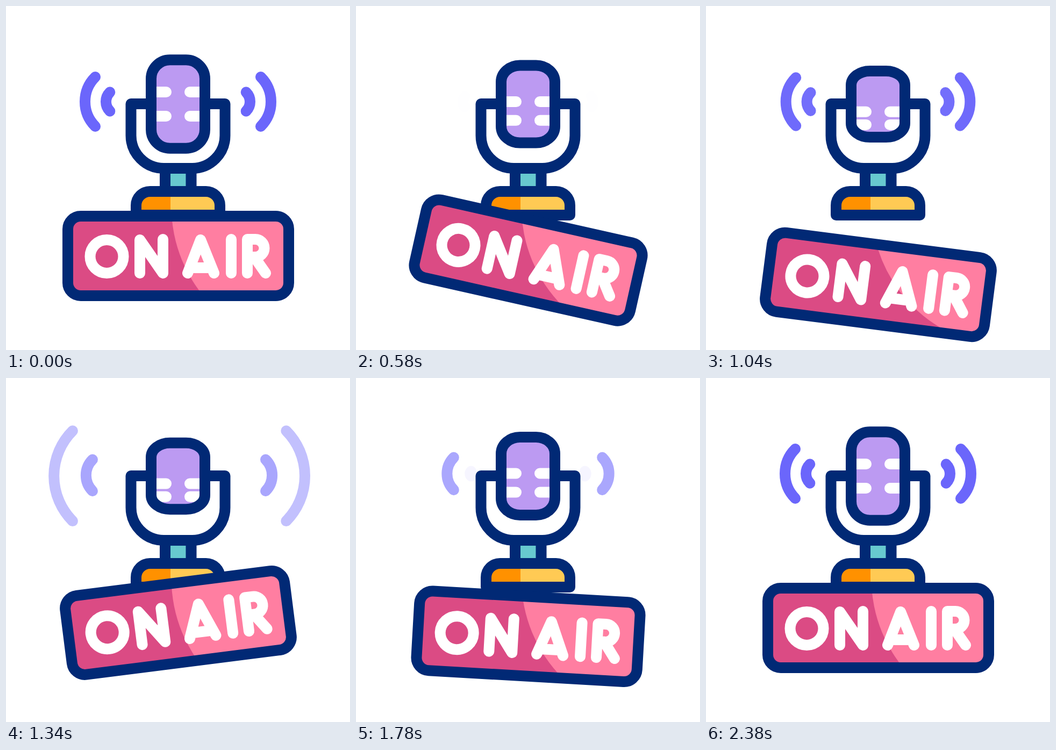
An HTML page for the animation above (2.4 s loop, 640x640 px).

```html
<!DOCTYPE html>
<html lang="en">
<head>
<meta charset="utf-8">
<title>On air</title>
<style>
  html, body { margin: 0; width: 100%; height: 100%; overflow: hidden; background: #fff; }
  svg { display: block; width: 100%; height: 100%; }
  .line { fill: none; stroke: #012975; stroke-width: 20; stroke-linejoin: round; }
  .white { fill: none; stroke: #fff; stroke-width: 20; stroke-linecap: round; stroke-linejoin: round; }
  #waves path { fill: none; stroke: #6b66fb; stroke-width: 20; stroke-linecap: round; }
</style>
</head>
<body>
<svg viewBox="0 0 640 640">
  <defs>
    <clipPath id="panel"><rect id="panelShape" x="115" y="391" width="411" height="148" rx="24"/></clipPath>
  </defs>
  <g id="waves"></g>

  <path class="line" d="M270 182H232.500V241A61 61 0 0 0 293.500 302H346.500A61 61 0 0 0 407.500 241V182H370"/>
  <path fill="#67c9cf" d="M300 312h40v30h-40z"/>
  <path class="line" d="M296 304V345M344.500 304V345"/>
  <path fill="#ff9100" d="M242 389V371a26 26 0 0 1 26-26h38v44z"/>
  <path fill="#ffca54" d="M306 345h66a26 26 0 0 1 26 26v18h-92z"/>
  <path class="line" d="M242 389V371a26 26 0 0 1 26-26H372a26 26 0 0 1 26 26v18z"/>

  <rect class="head" fill="#bc9af2" x="270" width="100" rx="35"/>
  <path id="bars" class="white"/>
  <rect class="head line" x="270" width="100" rx="35"/>

  <g class="sign">
    <rect fill="#db4b84" x="115" y="391" width="411" height="148" rx="24"/>
  </g>
  <circle clip-path="url(#panel)" fill="#ff7ea1" cx="570" cy="373" r="262.300"/>
  <g class="sign">
    <rect class="line" x="115" y="391" width="411" height="148" rx="24"/>
    <g class="white" role="img" aria-label="ON AIR">
      <circle cx="187.500" cy="466" r="31"/>
      <path d="M249 497V435L292 497V434"/>
      <path d="M338 497L362 435L387 497M347 487H378"/>
      <path d="M419 434V497"/>
      <path d="M449 497V434H464a16.500 16.500 0 0 1 0 33H449M462 467L483 497"/>
    </g>
  </g>
</svg>
<script>
const LOOP = 2400;
const $ = id => document.getElementById(id);
const all = selector => [...document.querySelectorAll(selector)];
const clamp = x => Math.min(1, Math.max(0, x));
const mix = (a, b, u) => a + (b - a) * u;
const smooth = x => { x = clamp(x); return x * x * (3 - 2 * x); };
const cubic = x => { x = clamp(x); return x < .5 ? 4 * x ** 3 : 1 - 4 * (1 - x) ** 3; };

// Eased interpolation through [time, value] pairs
function keys(t, list) {
  for (let i = 1; i < list.length; i++) {
    const [t0, a] = list[i - 1], [t1, b] = list[i];
    if (t < t1) return mix(a, b, smooth((t - t0) / (t1 - t0)));
  }
  return list[list.length - 1][1];
}

const TILT = [[0, 0], [785, 15.2], [820, 15.2], [1377, -7.5], [1900, 4.9], [2220, 0]];
const DROP = [[0, 0], [340, 36.4], [800, -16.5], [1045, 53.5], [1370, -11], [1790, 15.8], [2200, 0]];

// Each pose is [distance from the middle, radius, centre y]
const outer = { out: [0, 380], back: [380, 930], near: [108, 13, 178], rest: [108, 65, 178] };
const inner = { out: [77, 407], back: [640, 910], near: [101, 5, 178], rest: [109, 25, 178] };
const waves = [
  { ...outer, side: -1, far: [114, 142, 184] },
  { ...outer, side: 1, far: [121.5, 142, 184] },
  { ...inner, side: -1, far: [151, 58, 184] },
  { ...inner, side: 1, far: [159, 58, 184] },
];
for (const wave of waves) {
  wave.el = document.createElementNS("http://www.w3.org/2000/svg", "path");
  $("waves").append(wave.el);
}

const WAVE_START = 170, WAVE_PERIOD = 930;

function drawWave({ el, side, out, back, near, rest, far }, t) {
  const active = t >= WAVE_START && t < WAVE_START + 2 * WAVE_PERIOD;
  const phase = active ? (t - WAVE_START) % WAVE_PERIOD : 0;
  const leaving = phase < out[1];
  const [start, end] = leaving ? out : back;
  const u = smooth((phase - start) / (end - start));
  const [from, to] = leaving ? [rest, far] : [near, rest];
  const [d, r, y] = from.map((v, i) => mix(v, to[i], u));
  const h = r * Math.SQRT1_2, x = 320 + side * (d + h);
  el.setAttribute("d", `M${x} ${y - h}A${r} ${r} 0 0 ${side > 0 ? 1 : 0} ${x} ${y + h}`);
  el.setAttribute("opacity", leaving ? 1 - .85 * u : u);
}

function drawHead(t) {
  const k = t < 1170 ? cubic(t / 1170) : 1 - cubic((t - 1170) / 1200);
  const height = mix(164.5, 123, k);
  for (const el of all(".head")) {
    el.setAttribute("y", 182.5 - height / 2);
    el.setAttribute("height", height);
    el.setAttribute("ry", 35 * height / 164.5);
  }
  $("bars").setAttribute("d", [mix(160, 197, k), mix(205, 221, k)]
    .map(y => `M275 ${y}H298M342 ${y}H365`).join(""));
}

function drawSign(t) {
  const move = `translate(0 ${keys(t, DROP)}) rotate(${keys(t, TILT)} 320.5 465)`;
  for (const el of [...all(".sign"), $("panelShape")]) el.setAttribute("transform", move);
}

function frame() {
  const t = performance.now() % LOOP;
  waves.forEach(wave => drawWave(wave, t));
  drawHead(t);
  drawSign(t);
  requestAnimationFrame(frame);
}
frame();
</script>
</body>
</html>
```
